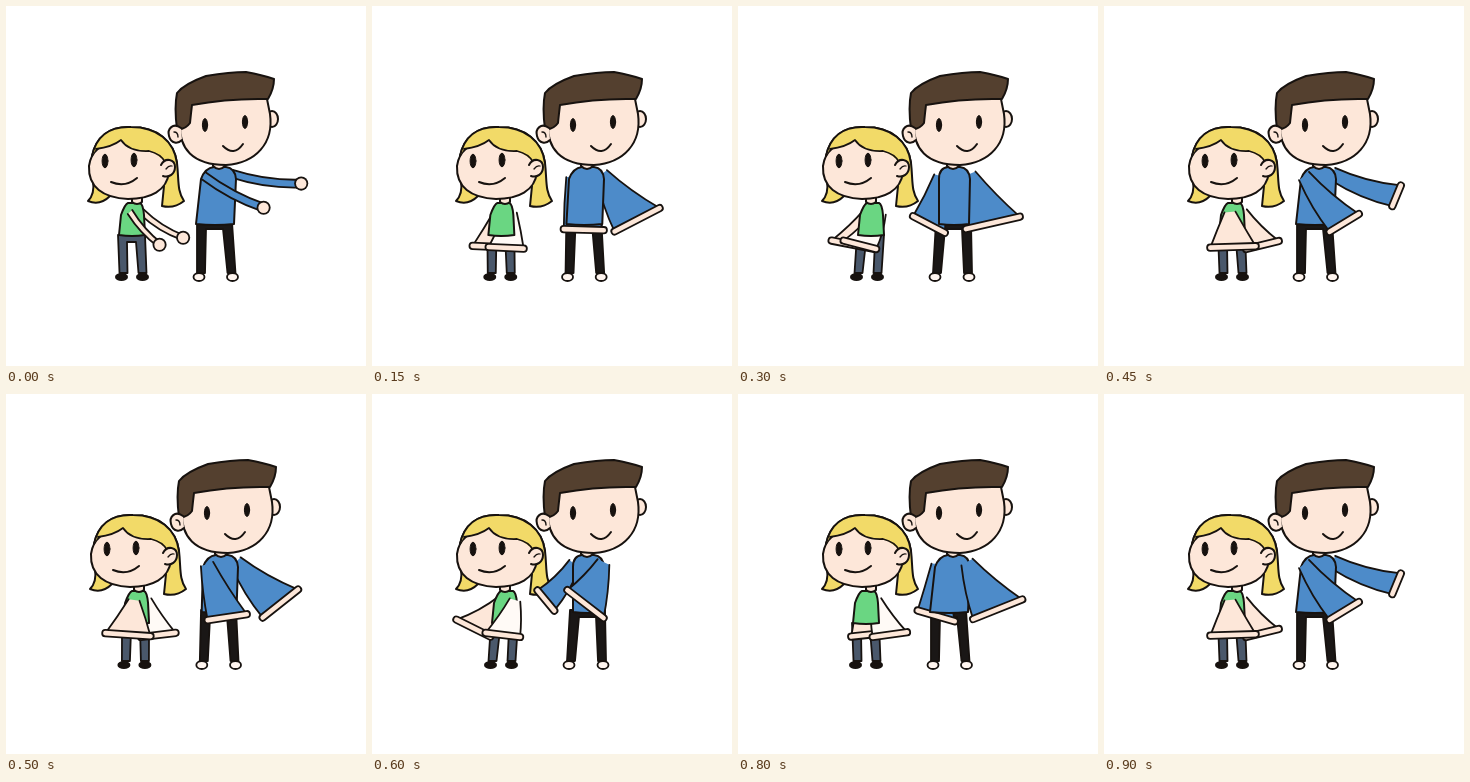
Animation of 360 by 360 pixels, one loop 0.95 s. Source, as an HTML page:

```html
<!DOCTYPE html>
<html lang="en">
<head>
<meta charset="utf-8">
<title>Swinging arms dance</title>
<style>
html, body { margin: 0; width: 100%; height: 100%; overflow: hidden; background: #fff; }
svg { display: block; width: 100vw; height: 100vh; }
</style>
</head>
<body>
<svg id="stage" viewBox="0 0 360 360" stroke-linecap="round" stroke-linejoin="round"></svg>
<script>
const INK = '#17120f', SKIN = '#fde7d9', BLUE = '#4d8bc9', GREEN = '#6ad682';
const BROWN = '#54402f', YELLOW = '#f2da68';

const LOOP = 950, STEP = 50;
const KEYS = [0, 3, 5, 8, 11, 14, 17];

// Arm angles in degrees from straight down, positive to the right, one per key;
// the last key repeats the swing to the right. "front" lists keys drawn over the shirt.
const man = {
  left: { x: 200, y: 170, swing: [62, -8, -15, 40, -39, -19, 40], blur: 20, front: [0, 3, 6] },
  right: { x: 229, y: 168, swing: [82, 20, 23, 71, -26, 17, 71], blur: 29, front: [4, 5] },
  sway: .5, width: 4, cuff: 4,
  reach: s => 56 + 13 * s,
  fill: () => BLUE
};
const girl = {
  left: { x: 126, y: 206, swing: [42, -22, -22, 4, -43, 16, 4], blur: 33, front: [0, 3, 6] },
  right: { x: 138, y: 206, swing: [58, -30, -30, 29, -17, 16, 29], blur: 26, front: [4] },
  sway: 1, width: 3, cuff: 2.5,
  reach: s => 37 + 16 * s * s,
  fill: (side, angle) => side === 'right' && angle < 22 ? '#fffaf6' : SKIN
};

const mix = (a, b, u) => a + (b - a) * u;
const clamp = (v, lo, hi) => Math.max(lo, Math.min(hi, v));
const path = (d, fill = 'none', w = 2, ink = INK) =>
  `<path d="${d}" fill="${fill}" stroke="${ink}" stroke-width="${w}"/>`;
const oval = (x, y, rx, ry, fill, w = 2) =>
  `<ellipse cx="${x}" cy="${y}" rx="${rx}" ry="${ry}" fill="${fill}" stroke="${INK}" stroke-width="${w}"/>`;

function swingAt(values, step) {
  const i = KEYS.findIndex((k, j) => step >= k && step <= KEYS[j + 1]);
  const u = (step - KEYS[i]) / (KEYS[i + 1] - KEYS[i]);
  return mix(values[i], values[i + 1], u * u * (3 - 2 * u));
}

function nearestKey(step) {
  const gaps = KEYS.map(k => Math.abs(k - step));
  return gaps.indexOf(Math.min(...gaps));
}

// A moving arm fills the fan it sweeps, with the hand smeared along the far edge.
function arm(who, side, step, sway) {
  const { x, y, swing, blur } = who[side], moving = step > 0;
  const angle = swingAt(swing, step), turn = angle * Math.PI / 180;
  const spread = moving ? blur * Math.cos(turn) * Math.PI / 180 : 0;
  const sx = x + sway * who.sway, sy = y;
  const nx = -Math.cos(turn), ny = Math.sin(turn);
  const shift = ([px, py], k) => [px + nx * k, py + ny * k];
  const reachTo = a => {
    const len = who.reach(Math.sin(a));
    return [sx + len * Math.sin(a), sy + len * Math.cos(a)];
  };
  const from = reachTo(turn - spread), to = reachTo(turn + spread);
  const w = who.width + (moving ? 2.5 : 0), cuff = moving ? 0 : who.cuff;
  const bend = 6 * Math.sin(turn);
  const curve = (p, q) => `Q${shift([(p[0] + q[0]) / 2, (p[1] + q[1]) / 2], bend)} ${q}`;
  const s1 = shift([sx, sy], w), s2 = shift([sx, sy], -w);
  const a = shift(from, cuff), b = shift(to, -cuff);
  const hand = `M${from}L${to}`, size = moving ? 4.6 : 10.5;
  return path(`M${s1}${curve(s1, a)}L${b}${curve(b, s2)}`, who.fill(side, angle), 1.8) +
    path(hand, 'none', size + 3.6) + path(hand, 'none', size, SKIN);
}

function torso(who, step, sway, shirt) {
  const key = nearestKey(step);
  const layer = front => ['left', 'right']
    .filter(side => who[side].front.includes(key) === front)
    .map(side => arm(who, side, step, sway)).join('');
  return layer(false) + shirt + layer(true);
}

function legs(hl, hr, fl, fr, top, w, fill) {
  const fork = top + 7, end = 267, half = w / 2 - .5;
  return path(`M${hl} ${top}H${hr}L${fr + half} ${end}H${fr - half}L${hr - w} ${fork}` +
    `H${hl + w}L${fl + half} ${end}H${fl - half}Z`, fill, 1.8);
}

function shirt(neck, half, top, left, right, bottom, fill) {
  const arch = top + 12;
  return path(`M${neck - 6} ${top}Q${neck - half} ${top + 1} ${Math.max(left, neck - half - 4)} ${arch}` +
    `L${left} ${bottom}Q${(left + right) / 2} ${bottom + 2} ${right} ${bottom}` +
    `L${neck + half + 1} ${arch}Q${neck + half} ${top + 1} ${neck + 6} ${top}Z`, fill);
}

const eyes = (pairs, rx, ry) => pairs.map(([x, y]) => oval(x, y, rx, ry, INK, 1)).join('');

const manHead =
  path('M209 156V160Q215 166 221 160V156', SKIN) +
  oval(268, 113, 6, 8, SKIN) +
  path('M176 118C175 142 188 159 222 159C252 157 270 137 266 108L262 88L185 95Z', SKIN) +
  path('M173 123C171 108 171 97 173 87Q180 78 202 70Q226 66 242 66Q258 69 270 73Q270 83 264 93' +
    'Q225 92 188 99Q187 107 186 117Q181 124 173 123Z', BROWN) +
  path('M177 122C169 116 163 123 165 130C167 138 174 138 178 134', SKIN) +
  path('M170 126Q174 126 174 131', 'none', 1.4) +
  eyes([[201, 119], [241, 116]], 2.6, 6.4) +
  path('M219 140Q230 151 239 138');

const hairTop = 'M88 150C92 131 105 120 127 121C153 121 170 135 173 157';
const girlHead =
  path('M128 190V196Q133 200 138 196V190', SKIN) +
  path(hairTop + 'C175 174 173 185 180 195Q170 203 158 200L160 180L106 190Q96 200 84 195Q91 188 89 175Z', YELLOW) +
  path('M85 160C87 145 97 137 117 133C142 137 164 148 165 166C163 185 146 193 124 193C99 192 84 181 85 160Z', SKIN) +
  path(hairTop + 'L165 165Q160 150 145 145Q125 146 117 134Q108 141 92 143Z', YELLOW, 0, 'none') +
  path(hairTop) +
  path('M92 143Q108 141 117 134Q125 146 145 145Q157 148 161 156', 'none', 1.8) +
  path('M157 159C161 151 171 153 171 161C171 168 165 172 159 170', SKIN) +
  path('M162 163Q165 159 168 160', 'none', 1.3) +
  eyes([[101, 155], [130, 154]], 2.9, 6.8) +
  path('M107 176Q121 182 133 172');

function drawGirl(step, sway) {
  const fl = 117.5 + sway * .2, fr = 137.5 + sway * .2;
  return legs(114 + sway, 141 + sway, fl + 2, fr + 1, 229, 9, '#4a586b') +
    oval(fl, 271, 5.5, 3, INK) + oval(fr + 1, 271, 5.5, 3, INK) +
    torso(girl, step, sway, shirt(130 + sway, 9, 197, 115 + sway, 141 + sway, 229, GREEN)) +
    girlHead;
}

function drawMan(step, sway) {
  const fl = 195 + sway * .4, fr = 228.5 + sway * .5;
  return oval(fl, 271, 5.5, 4, '#fff5ef', 1.8) + oval(fr, 271, 5.5, 4, '#fff5ef', 1.8) +
    legs(193 + sway, 228 + sway, fl + 2, fr - 1, 216, 9, '#1a1716') +
    torso(man, step, sway, shirt(216, 15, 161, 192 + sway * 1.8, 230 + sway * .2, 218, BLUE)) +
    manHead;
}

// Hips move against the girl's swing; the whole picture sits left at rest.
function draw(step) {
  const sway = clamp(-swingAt(girl.left.swing, step) / 4, 0, 5);
  return `<g transform="translate(${step ? 0 : -2} 0)">${drawGirl(step, sway)}${drawMan(step, sway)}</g>`;
}

const stage = document.getElementById('stage');
let start, shown = 0;
function tick(now) {
  start ??= now;
  const step = Math.max(0, Math.floor((now - start) % LOOP / STEP) - 1);
  if (step !== shown) stage.innerHTML = draw(shown = step);
  requestAnimationFrame(tick);
}
stage.innerHTML = draw(0);
requestAnimationFrame(tick);
</script>
</body>
</html>
```
